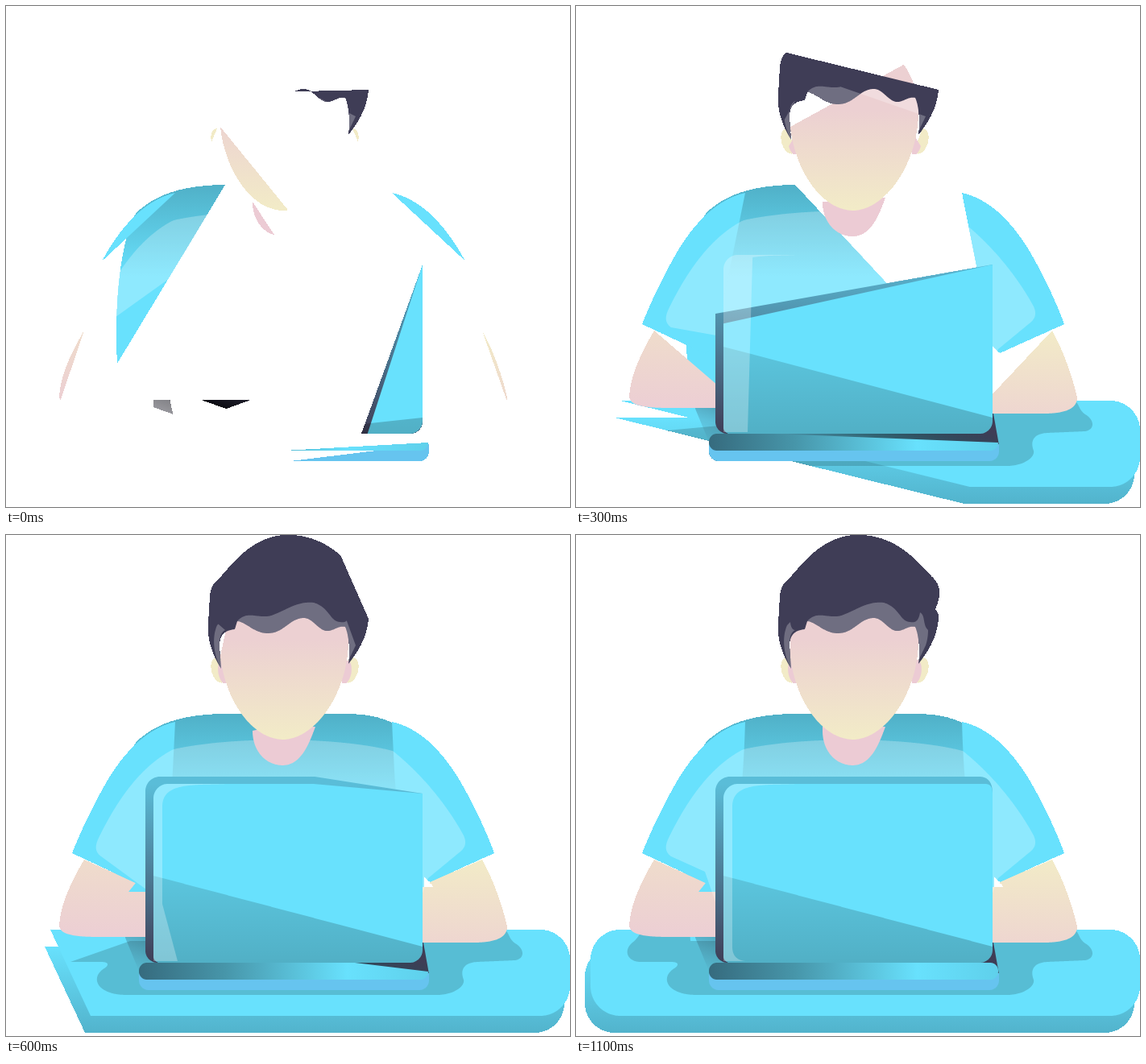
Recreate the animation shown at these times as an HTML page with a canvas. Size 700x622 px, loop 1.6 s.

```html
<!DOCTYPE html>
<html lang="en">
<head>
<meta charset="utf-8">
<title>Working at a laptop</title>
<style>
html, body { margin: 0; width: 100%; height: 100%; overflow: hidden; background: #fff; }
canvas { display: block; }
</style>
</head>
<body>
<canvas id="stage" width="700" height="622"></canvas>
<script>
const LOOP = 1600, W = 700, H = 622;
const ctx = document.getElementById('stage').getContext('2d', { willReadFrequently: true });

// Linear gradient from (x0, y0) to (x1, y1) with [offset, colour] stops.
function grad(x0, y0, x1, y1, ...stops) {
  const g = ctx.createLinearGradient(x0, y0, x1, y1);
  stops.forEach(([at, color]) => g.addColorStop(at, color));
  return g;
}
const down = (y0, y1, from, to) => grad(0, y0, 0, y1, [0, from], [1, to]);

// Samples an outline about once per pixel.
function shape(fill, d) {
  const path = document.createElementNS('http://www.w3.org/2000/svg', 'path');
  path.setAttribute('d', d);
  const len = path.getTotalLength(), n = Math.ceil(len), pts = [];
  for (let i = 0; i <= n; i++) pts.push(path.getPointAtLength(len * i / n));
  return { fill, pts };
}

const CYAN = '#68e1fd', DARK = '#3f3d56', PINK = '#eccbd4', CREAM = '#f2ebc7';
const SHINE = 'rgba(255,255,255,.25)';
const wave = 'C427 146 426 125 421 114C412 112 406 120 397 119C387 117 380 103 370 103' +
  'C352 103 345 122 325 122C308 122 298 108 287 107';

// Back to front.
const shapes = [
  // desk and its shadow
  shape(down(511, 618, CYAN, '#52b3cc'),
    'M48 511H656a37 37 0 0 1 37 37V581a37 37 0 0 1-37 37H48a37 37 0 0 1-37-37V548a37 37 0 0 1 37-37Z'),
  shape(CYAN,
    'M55 490H663a37 37 0 0 1 37 37V560a37 37 0 0 1-37 37H55a37 37 0 0 1-37-37V527a37 37 0 0 1 37-37Z'),
  shape('rgba(0,0,0,.16)',
    'M80 530H118C128 530 128 534 122 538C104 549 112 571 150 571H535C556 571 570 560 568 552' +
    'C564 542 566 531 585 530L632 528C644 526 644 514 632 507C622 500 625 490 616 490H100' +
    'C75 490 82 497 70 506C58 516 64 530 80 530Z'),
  // body and keyboard
  shape(down(222, 335, '#50b0c7', CYAN),
    'M272 222C220 223 190 232 162 256C142 290 134 370 138 443L142 504H518C518 420 521 340 520 285' +
    'C500 228 460 222 415 222Z'),
  shape(grad(217, 562, 269, 416, [0, 'rgba(50,48,70,0)'], [.5, 'rgba(13,13,20,.5)'], [.85, DARK]),
    'M165 541L148 500Q147 489 158 489H515L525 545Z'),
  // arms and sleeves
  shape(down(403, 499, '#efdccb', '#ecced4'),
    'M97 403C80 432 68 458 66 485C67 500 100 499 130 499H179Q184 470 179 443H152L161 432Z'),
  shape(down(403, 506, CREAM, '#eed6d0'),
    'M591 403C603 425 615 455 622 486C622 503 600 506 580 506H511L517 437H531L525 431Z'),
  shape(CYAN, 'M210 232C169 241 139 280 120 315Q97 357 82 395L161 432L174 420C199 400 207 330 210 232Z'),
  shape(CYAN, 'M479 232C520 241 550 280 569 315Q592 357 606 395L526 431L515 420C490 400 482 330 479 232Z'),
  shape(SHINE,
    'M118 399C108 392 112 382 116 374C140 325 170 285 208 266C280 250 410 250 480 268' +
    'C520 300 550 340 568 373C572 382 570 388 564 393L524 426L505 476H180L160 418Z'),
  // head
  shape(PINK, 'M306 243C306 268 322 286 344 286C364 285 374 266 384 238H306Z'),
  shape(CREAM, 'M262 152C253 152 252 168 259 178C263 184 268 184 270 183L275 160Z'),
  shape(PINK, 'M275 156V184H270C262 178 261 160 267 155Z'),
  shape(CREAM, 'M430 152C439 152 440 168 433 178C429 184 424 184 422 183L417 160Z'),
  shape(PINK, 'M417 156V184H422C430 178 431 160 425 155Z'),
  shape(down(130, 252, '#ecd0d2', CREAM),
    'M266 150C272 205 305 254 345 254C385 252 425 195 425 130C424 75 385 40 345 38C300 40 262 80 266 150Z'),
  shape(DARK,
    'M450 104C448 128 436 146 425 160' + wave +
    'L284 117C274 118 265 122 265 138L267 166C256 148 249 130 251 105C254 85 250 70 259 59' +
    'C275 46 300 0 350 0C400 0 425 35 445 55C454 66 452 78 446 92C450 97 450 100 450 104Z'),
  shape(SHINE,
    'M434 137L424 158' + wave +
    'C300 92 315 106 332 99C350 92 362 82 382 84C402 90 402 108 415 108C424 110 426 102 427 96' +
    'C434 100 430 112 437 118Q437 128 434 137Z'),
  shape(SHINE, 'M272 118C265 122 265 130 265 138L267 166C258 150 255 128 262 112L266 108Q267 118 272 118Z'),
  // laptop lid and base
  shape(down(310, 531, '#5abdd8', DARK),
    'M517 321V516a15 15 0 0 1-15 15H188a15 15 0 0 1-15-15V318a18 18 0 0 1 18-18H500Q517 300 517 321Z'),
  shape(CYAN,
    'M517 321V515a16 16 0 0 1-16 16H191a8 8 0 0 1-8-8V327a18 18 0 0 1 18-18H508Q517 309 517 321Z'),
  shape(down(423, 531, 'rgba(0,0,0,.12)', 'rgba(0,0,0,.22)'),
    'M517 511V515a16 16 0 0 1-16 16H191a8 8 0 0 1-8-8V423Z'),
  shape('rgba(255,255,255,.27)',
    'M213 529H183V327a18 18 0 0 1 18-18H274C235 311 194 306 194 337V511Q194 529 213 529Z'),
  shape('#66c4ef', 'M525 544V553a12 12 0 0 1-12 12H177a12 12 0 0 1-12-12V543Z'),
  shape(grad(165, 0, 524, 0, [0, '#366b7e'], [.3, '#4796aa'], [.72, CYAN], [1, '#5fd0eb']),
    'M524 542a10 10 0 0 1-10 10H175a10 10 0 0 1-10-10V541a10 10 0 0 1 10-10H514a10 10 0 0 1 10 10Z')
];

// Share of each outline drawn, as [ms, share], joined smoothly.
const keys = [[-150, .1], [0, .249], [120, .384], [220, .515], [300, .615],
  [460, .778], [780, .953], [1100, 1], [1400, 1]];
const slope = (a, b) => (b[1] - a[1]) / (b[0] - a[0]);

function progress(t) {
  if (t >= 1100) return 1;
  let i = 1;
  while (keys[i + 1][0] <= t) i++;
  const a = keys[i], b = keys[i + 1], span = b[0] - a[0], u = (t - a[0]) / span;
  const m0 = slope(keys[i - 1], b) * span, m1 = slope(a, keys[i + 2]) * span;
  const u2 = u * u, u3 = u2 * u;
  return Math.min(1, (2 * u3 - 3 * u2 + 1) * a[1] + (u3 - 2 * u2 + u) * m0 +
    (3 * u2 - 2 * u3) * b[1] + (u3 - u2) * m1);
}

// Fills the first share p of an outline, closed by a straight chord.
function fillPart({ fill, pts }, p) {
  const end = p * (pts.length - 1), n = Math.floor(end);
  ctx.beginPath();
  for (let i = 0; i <= n; i++) ctx.lineTo(pts[i].x, pts[i].y);
  if (n < pts.length - 1) {
    const a = pts[n], b = pts[n + 1], k = end - n;
    ctx.lineTo(a.x + (b.x - a.x) * k, a.y + (b.y - a.y) * k);
  }
  ctx.fillStyle = fill;
  ctx.fill();
}

// One-bit transparency: faint layers show only on top of solid ones.
function hardenAlpha() {
  const img = ctx.getImageData(0, 0, W, H), d = img.data;
  for (let i = 3; i < d.length; i += 4) d[i] = d[i] > 127 ? 255 : 0;
  ctx.putImageData(img, 0, 0);
}

let start, last;
function draw(now) {
  start ??= now;
  const p = progress(Math.floor((now - start) % LOOP / 20) * 20);
  if (p !== last) {
    last = p;
    ctx.clearRect(0, 0, W, H);
    shapes.forEach(s => fillPart(s, p));
    hardenAlpha();
  }
  requestAnimationFrame(draw);
}
requestAnimationFrame(draw);
</script>
</body>
</html>
```
